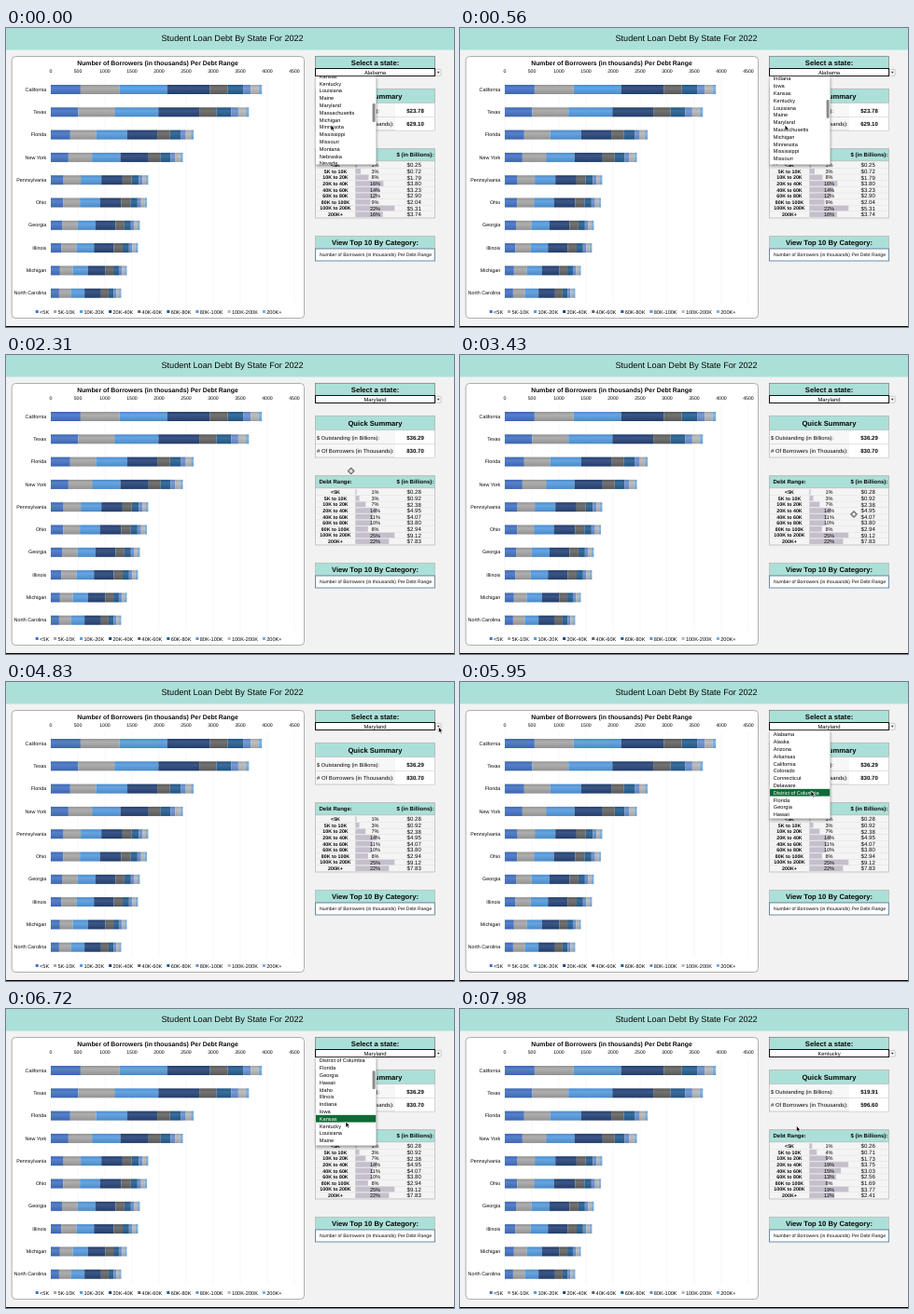
Animation of 480 by 321 pixels, one loop 8000 ms. Source, as an HTML page:

```html
<!DOCTYPE html>
<html lang="en">
<head>
<meta charset="utf-8">
<title>Student Loan Debt By State</title>
<style>
html, body { margin: 0; width: 100%; height: 100%; overflow: hidden; background: #f2f2f2; }
svg { display: block; width: 480px; height: 321px; }
text { font-family: "Liberation Sans", Arial, sans-serif; text-rendering: geometricPrecision; white-space: pre; }
</style>
</head>
<body>
<svg id="stage" viewBox="0 0 480 321">
  <defs>
    <linearGradient id="shade" x2="0" y2="1">
      <stop offset="0" stop-color="#000" stop-opacity=".1"/>
      <stop offset=".35" stop-color="#fff" stop-opacity=".1"/>
      <stop offset="1" stop-color="#000" stop-opacity=".12"/>
    </linearGradient>
    <clipPath id="listClip"><rect x="332" y="52" width="64.5" height="94.5"/></clipPath>
    <filter id="soft" x="-20%" y="-20%" width="140%" height="140%"><feGaussianBlur stdDeviation="1.6"/></filter>
  </defs>
</svg>
<script>
const LOOP = 8000, STEP = 70;
const MINT = '#abe0d8', INK = '#080808', LINE = '#b5b5b5';
const stage = document.getElementById('stage');

const clamp = v => Math.min(1, Math.max(0, v));
const lerp = (a, b, p) => a + (b - a) * p;
const ramp = (t, from, to) => clamp((t - from) / (to - from));
const smooth = p => p * p * (3 - 2 * p);
const stroke = (color, width = 0.7) => ({ stroke: color, 'stroke-width': width });

function add(parent, tag, attrs = {}) {
  const el = document.createElementNS('http://www.w3.org/2000/svg', tag);
  for (const k in attrs) el.setAttribute(k, attrs[k]);
  return parent.appendChild(el);
}
function rect(parent, x, y, width, height, fill, extra) {
  return add(parent, 'rect', { x, y, width, height, fill, ...extra });
}
// y is the vertical middle of the capitals
function label(parent, str, x, y, size, anchor = 'start', bold = false) {
  const el = add(parent, 'text', {
    x, y: y + size * 0.36, 'font-size': size, 'text-anchor': anchor,
    'font-weight': bold ? 700 : 400, fill: INK
  });
  el.textContent = str;
  return el;
}

// Page and title band
rect(stage, 0, 0, 480, 321, '#f2f2f2');
rect(stage, 0, 0, 480, 23.5, MINT);
label(stage, 'Student Loan Debt By State For 2022', 242.6, 11.2, 9.15, 'middle');
rect(stage, 0, 320, 480, 1, '#000');

// Chart
const LEFT = 48, UNIT = 0.058, PITCH = 24.3;
const TOPIC = 'Number of Borrowers (in thousands) Per Debt Range';
rect(stage, 6.2, 30.5, 313.3, 281, '#fff', { rx: 4, ...stroke('#a6a6a6', 0.9) });
label(stage, TOPIC, 162.5, 37.2, 6.87, 'middle', true);
for (let n = 0; n <= 4500; n += 500) {
  const x = LEFT + n * UNIT;
  rect(stage, x - 0.25, 53, 0.5, 243, '#ededed');
  label(stage, n, x, 46, 5.2, 'middle');
}

const SERIES = [['<5K', '#4472c4'], ['5K-10K', '#a5a5a5'], ['10K-20K', '#559bdf'], ['20K-40K', '#264478'],
  ['40K-60K', '#636363'], ['60K-80K', '#255e91'], ['80K-100K', '#698ed0'], ['100K-200K', '#b7b7b7'],
  ['200K+', '#7cafdd']];
const BORROWERS = {
  'California': 3900, 'Texas': 3660, 'Florida': 2640, 'New York': 2440, 'Pennsylvania': 1800,
  'Ohio': 1775, 'Georgia': 1645, 'Illinois': 1610, 'Michigan': 1405, 'North Carolina': 1300
};
// Shares of each debt range drift from the largest state to the smallest
const MIX_TOP = [0.141, 0.185, 0.225, 0.203, 0.084, 0.075, 0.035, 0.035, 0.017];
const MIX_END = [0.118, 0.166, 0.195, 0.235, 0.107, 0.072, 0.04, 0.037, 0.03];

Object.entries(BORROWERS).forEach(([name, total], i) => {
  const y = 66 + i * PITCH;
  label(stage, name, 43.3, y - 0.3, 5.4, 'end');
  let x = LEFT;
  SERIES.forEach(([, color], k) => {
    const w = total * UNIT * lerp(MIX_TOP[k], MIX_END[k], i / 9);
    rect(stage, x, y - 5, w, 10, color);
    x += w;
  });
  rect(stage, LEFT, y - 5, x - LEFT, 10, 'url(#shade)');
});

let keyX = 36;
for (const [name, color] of SERIES) {
  rect(stage, keyX - 4.3, 303, 3, 3, color);
  keyX += label(stage, name, keyX, 304.5, 5.6).getComputedTextLength() + 9.3;
}

// Right-hand panels
const MID = 395.5;
function heading(str, y, h, line = LINE) {
  rect(stage, 331.5, y, 128, h, MINT, stroke(line));
  label(stage, str, MID, y + h / 2, 7.65, 'middle', true);
}
heading('Select a state:', 30.3, 13.2, '#777');
rect(stage, 331.5, 43.5, 128, 8, '#fff', stroke('#111', 1));
const stateText = label(stage, '', MID, 47.5, 5.9, 'middle');
rect(stage, 460.3, 44.4, 5.8, 6.8, '#fafafa', { rx: 0.8, ...stroke('#aaa', 0.6) });
add(stage, 'path', { d: 'M461.7 46.8h3l-1.5 2.2z', fill: '#444' });

rect(stage, 331.5, 65.3, 128, 44.7, '#f7f7f7', stroke(LINE));
rect(stage, 417, 80, 42.2, 29.7, '#fff');
heading('Quick Summary', 65.3, 15);
rect(stage, 331.5, 95.3, 128, 0.6, '#cfcfcf');
label(stage, '$ Outstanding (in Billions):', 333, 88.5, 5.75);
label(stage, '# Of Borrowers (in Thousands):', 333, 102.9, 5.95);
const debtText = label(stage, '', 438.5, 88.5, 6.1, 'middle', true);
const peopleText = label(stage, '', 438.5, 102.9, 6.1, 'middle', true);

rect(stage, 331.5, 129.8, 128, 74.2, '#f4f4f4', stroke(LINE));
rect(stage, 331.5, 129.8, 128, 13, MINT, stroke(LINE));
label(stage, 'Debt Range:', 335.5, 136.2, 6, 'start', true);
label(stage, '$ (in Billions):', 458.4, 136.2, 6.05, 'end', true);
const rows = SERIES.map(([name], i) => {
  const y = 147.1 + i * 6.63;
  rect(stage, 331.5, y + 3.2, 128, 0.35, '#d6d6d6');
  label(stage, name.replace('-', ' to '), 353, y, 5.3, 'middle', true);
  return {
    bar: rect(stage, 374.3, y - 2.8, 0, 5.6, '#c5bfcc'),
    share: label(stage, '', 395.5, y, 5.6, 'middle'),
    value: label(stage, '', 437.2, y, 6.1, 'middle')
  };
});

heading('View Top 10 By Category:', 223.3, 13.7);
rect(stage, 331.5, 237, 128, 13, '#fff', stroke('#5f7f9c', 0.9));
label(stage, TOPIC, 396, 243.4, 5.1, 'middle');

// Drop-down list
const ROW = 7.8, FIRST = 56.3;
const STATES = ('Alabama,Alaska,Arizona,Arkansas,California,Colorado,Connecticut,Delaware,District of Columbia,' +
  'Florida,Georgia,Hawaii,Idaho,Illinois,Indiana,Iowa,Kansas,Kentucky,Louisiana,Maine,Maryland,Massachusetts,' +
  'Michigan,Minnesota,Mississippi,Missouri,Montana,Nebraska,Nevada,New Hampshire,New Jersey').split(',');
const list = add(stage, 'g');
rect(list, 332, 53.5, 65, 95, '#000', { opacity: 0.4, filter: 'url(#soft)' });
rect(list, 331.8, 52, 64.9, 94.7, '#fff', stroke('#c4c4c4', 0.5));
const view = add(list, 'g', { 'clip-path': 'url(#listClip)' });
const scroller = add(view, 'g');
const mark = rect(scroller, 332, 0, 64.5, ROW, '#0f6a37');
const items = STATES.map((name, i) => label(scroller, name, 335.8, FIRST + i * ROW, 5.65));
const thumb = rect(list, 392.6, 52, 3, 20, '#8a8a8a', { rx: 1.4 });

// Pointers
const arrow = add(stage, 'path', {
  d: 'M0 0V6.2L1.5 4.9L2.5 7.1L3.5 6.6L2.5 4.5H4.5Z', fill: '#000', ...stroke('#fff', 0.6)
});
const cross = add(stage, 'path', {
  d: 'M-1-3H1V-1H3V1H1V3H-1V1H-3V-1H-1Z', fill: '#fff', ...stroke('#333', 0.8)
});

// Amounts in billions per debt range; totals and shares follow from them
const DATA = {
  Alabama: { people: 629.10, values: [0.25, 0.72, 1.79, 3.80, 3.23, 2.90, 2.04, 5.31, 3.74] },
  Maryland: { people: 830.70, values: [0.28, 0.92, 2.38, 4.95, 4.07, 3.80, 2.94, 9.12, 7.83] },
  Kentucky: { people: 596.60, values: [0.26, 0.71, 1.73, 3.75, 3.03, 2.56, 1.69, 3.77, 2.41] }
};

let shown = '';
function showState(name) {
  if (name === shown) return;
  shown = name;
  const { people, values } = DATA[name];
  const top = Math.max(...values);
  const debt = values.reduce((a, b) => a + b);
  stateText.textContent = name;
  debtText.textContent = '$' + debt.toFixed(2);
  peopleText.textContent = people.toFixed(2);
  rows.forEach((row, i) => {
    row.bar.setAttribute('width', 42 * values[i] / top);
    row.share.textContent = Math.round(100 * values[i] / debt) + '%';
    row.value.textContent = '$' + values[i].toFixed(2);
  });
}

// Pointer moves: leave at, arrive at, goal
const ORIGIN = { x: 348, y: 104 };
const MOVES = [
  { from: 500, to: 1330, x: 359, y: 115 },
  { from: 2100, to: 2900, x: 422, y: 171 },
  { from: 3850, to: 4500, x: 463.5, y: 48.3 },
  { from: 5110, to: 5800, x: 376, y: 117 },
  { from: 6100, to: 6580, x: 364, y: 121 },
  { from: 6790, to: 7140, x: 360.5, y: 125.5 }
];
const PICK_1 = 1960, OPEN = 5040, PICK_2 = 7490;

function pointerAt(t) {
  return MOVES.reduce((at, m) => {
    const p = smooth(ramp(t, m.from, m.to));
    return { x: lerp(at.x, m.x, p), y: lerp(at.y, m.y, p) };
  }, ORIGIN);
}
function scrollAt(t) {
  return t < PICK_1 ? lerp(129.4, 97.3, ramp(t, 0, 980)) : 63.4 * ramp(t, 6100, 6580);
}

const show = (el, on) => el.setAttribute('visibility', on ? 'visible' : 'hidden');
const move = (el, x, y) => el.setAttribute('transform', `translate(${x} ${y})`);

function drawList(t, x, y) {
  const s = scrollAt(t);
  const still = t < OPEN ? s === scrollAt(t - STEP) && t > 0 : s === scrollAt(t + STEP);
  const inside = x > 332 && x < 396 && y > 52 && y < 146;
  const hot = still && inside ? Math.round((y - FIRST + s) / ROW) : -1;
  move(scroller, 0, -s);
  show(mark, hot >= 0);
  mark.setAttribute('y', FIRST + (hot - 0.5) * ROW);
  items.forEach((el, i) => el.setAttribute('fill', i === hot ? '#fff' : INK));
  thumb.setAttribute('y', 52 + s * 0.225);
  show(thumb, s > 0);
}

function draw(t) {
  showState(t < PICK_1 ? 'Alabama' : t < PICK_2 ? 'Maryland' : 'Kentucky');
  const { x, y } = pointerAt(t);
  const open = t < PICK_1 || (t >= OPEN && t < PICK_2);
  list.setAttribute('display', open ? 'inline' : 'none');
  if (open) drawList(t, x, y);

  const onSheet = t > 2100 && t < 4400;
  show(cross, onSheet);
  show(arrow, !onSheet);
  move(onSheet ? cross : arrow, x, y);
}

const start = performance.now();
function tick() {
  const t = (performance.now() - start) % LOOP;
  draw(Math.floor(t / STEP) * STEP);
  requestAnimationFrame(tick);
}
tick();
</script>
</body>
</html>
```
